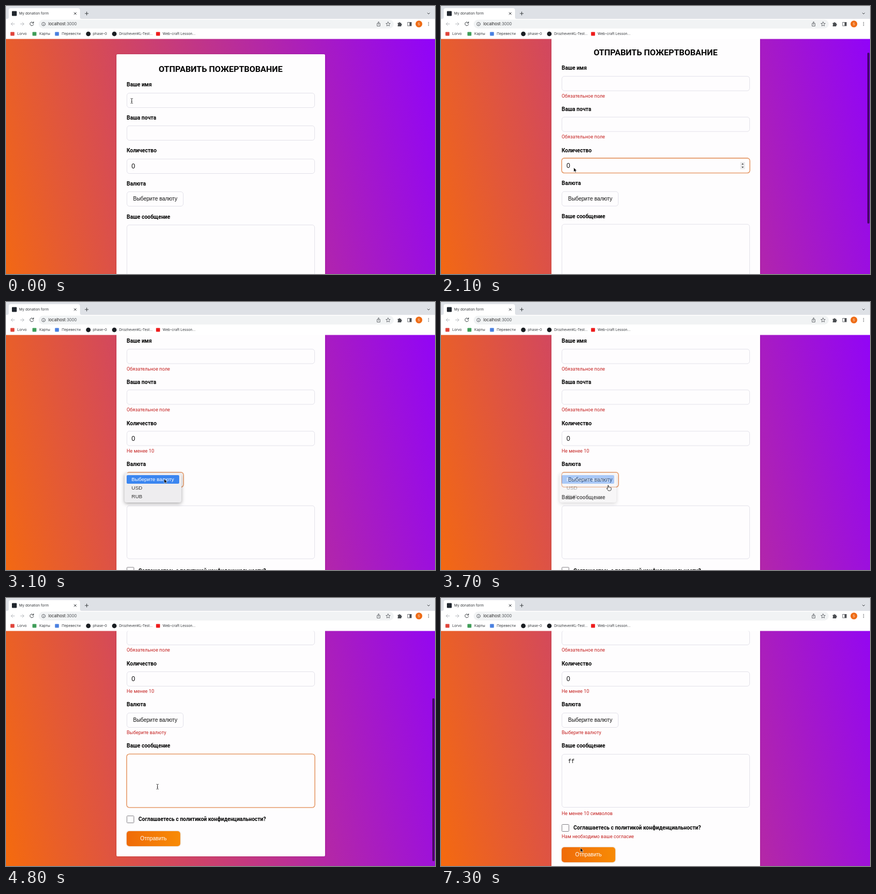
These frames come from a looping animation (800x500 px, 7.4 s). An HTML page:

```html
<!DOCTYPE html>
<html lang="ru">
<head>
<meta charset="utf-8">
<title>My donation form</title>
<style>
* { box-sizing: border-box; }
html, body { margin: 0; width: 100%; height: 100%; overflow: hidden; }
#stage { position: relative; width: 800px; height: 500px; overflow: hidden; background: #fff; }
svg { position: absolute; left: 0; top: 0; }
#browser { z-index: 1; font: 6.6px Inter, sans-serif; }

#view { position: absolute; top: 61px; width: 800px; height: 439px; overflow: hidden; }
#page { padding: 29px 0 28px; background: linear-gradient(78deg, #f56b0d, #9003fa); }
#card {
  margin-left: 205.5px; width: 389.5px; padding: 18px 19.5px 19.5px;
  border-radius: 2px; background: #fefdfe; box-shadow: 0 0 3px rgba(0, 0, 0, .14);
  font: 8.89px Roboto, sans-serif; color: #000;
}
h1 { margin: 0 0 12px; font-size: 15.56px; line-height: 20px; text-align: center; white-space: nowrap; }
.field { margin-bottom: 12.15px; }
.label { font-size: 10px; font-weight: 700; line-height: 14px; white-space: nowrap; }
.box {
  position: relative; margin-top: 7.5px; height: 28px; padding-left: 8px;
  border: 1px solid #e3e2ea; border-radius: 5px; background: #fefdfe;
  font: 12.2px/26px "Liberation Sans", Arial, sans-serif; color: #111;
}
.select { width: 106px; padding-left: 11px; font-size: 10px; }
.area { height: 100px; padding: 8px 11px; font: 10px/12px "Liberation Mono", monospace; }
.error { display: none; height: 15.2px; padding-top: 4px; line-height: 11px; color: #c4201f; }
.invalid .error { display: block; }
#message { margin-bottom: 15.5px; }
#message .error { padding-top: 6px; }
#agree { position: relative; margin-bottom: 14.5px; }
#agree .label { padding-left: 22px; }
#agree .box { position: absolute; left: 0; top: 0; width: 14px; height: 14px; margin: 0; border-color: #858388; border-radius: 1.5px; }
.focus .box, #agree.focus .box { border-color: #ebab80; box-shadow: 0 0 0 .6px #de8146; }
.button {
  width: 100px; height: 28px; border-radius: 5px; background: linear-gradient(90deg, #ef6b08, #f88b05);
  box-shadow: 0 0 2px rgba(120, 60, 0, .5);
  font: 10px/28px "Liberation Sans", Arial, sans-serif; color: #fff; text-align: center;
}
#spinner { left: auto; right: 8px; top: 6px; position: absolute; }

#scrollbar { position: absolute; left: 795px; width: 4px; border-radius: 2px; background: rgba(0, 0, 0, .55); }
#suggest {
  position: absolute; left: 280px; top: 271px; width: 120px; height: 50px; border-radius: 2px;
  background: #fff; box-shadow: 0 1px 3px rgba(0, 0, 0, .4); font: 7px/24px Inter, sans-serif; color: #222;
}
#suggest::before {
  content: ""; position: absolute; left: 9px; top: -3px; width: 7px; height: 7px;
  background: #fff; transform: rotate(45deg); box-shadow: -1px -1px 1px rgba(0, 0, 0, .1);
}
#suggest div { position: relative; height: 25px; padding-left: 7px; white-space: nowrap; }
#suggest div + div { padding-left: 22px; border-top: 1px solid #ddd; color: #666; }
#suggest i { position: absolute; left: 8px; top: 8px; width: 7px; height: 7px; border-radius: 50%; background: #666; }
#menu {
  position: absolute; left: 221px; top: 319px; width: 106px; height: 55px; padding: 4px; border-radius: 4px;
  background: #eeedef; box-shadow: 0 2px 7px rgba(0, 0, 0, .35); font: 9.6px/16px "Liberation Sans", Arial, sans-serif; color: #333;
}
#menu div { height: 16px; padding-left: 9px; border-radius: 2px; white-space: nowrap; }
#menu div:first-child { background: #3b86f0; color: #fff; }
</style>
</head>
<body>
<div id="stage">
  <svg id="browser" width="800" height="62" fill="none" stroke-linecap="round">
    <path fill="#dee1e6" d="M0 0H800V24H0z"/>
    <path fill="#fff" d="M0 24H800V61.500H0z"/>
    <path fill="#fff" d="M2 24q3 0 3-3V8q0-4 4-4H134q4 0 4 4V21q0 3 3 3z"/>
    <rect x="11" y="9.500" width="9" height="9" rx="1" fill="#20262d"/>
    <g stroke="#3c4043">
      <path d="M127 12l4 4m0-4l-4 4M147.500 14h6m-3-3v6M786 13l2 2 2-2"/>
      <path d="M51 31.500a3.400 3.400 0 1 0 .4 2.800M51.500 29.500v2.500h-2.500"/>
    </g>
    <path stroke="#b9bcc0" d="M16 33.500H9.500m3-3l-3 3 3 3M27 33.500h6.500m-3-3l3 3-3 3"/>
    <rect x="61" y="25.500" width="662" height="16.500" rx="8.250" fill="#f1f3f4"/>
    <g stroke="#5f6368" stroke-width=".9">
      <circle cx="70" cy="33.700" r="3.300"/>
      <path d="M70 33.500v2M70 31.800v.1"/>
      <path d="M693.500 32.500h-1.500v5h5.500v-5H696M694.800 35v-5.500m-1.500 1.500l1.500-1.500 1.500 1.500"/>
      <path d="M712.500 29.700l1.200 2.600 2.800.3-2.100 1.900.6 2.800-2.500-1.400-2.500 1.400.6-2.800-2.100-1.900 2.800-.3z"/>
      <rect x="749" y="30.500" width="7" height="6.500"/>
    </g>
    <g fill="#4a4d51">
      <path d="M752.500 30.500H756V37h-3.500zM730.500 31.500h2a1.300 1.300 0 0 1 2.600 0h2v2a1.300 1.300 0 0 1 0 2.600v2h-6.600v-2.200a1.200 1.200 0 0 0 0-2.200z"/>
      <circle cx="788" cy="30.800" r=".8"/><circle cx="788" cy="33.500" r=".8"/><circle cx="788" cy="36.200" r=".8"/>
    </g>
    <circle cx="770" cy="33.500" r="6.300" fill="#ee6c16"/>
    <text x="770" y="35.800" font-size="6" fill="#fff" text-anchor="middle">S</text>
    <text x="24.500" y="16.400" fill="#33363a">My donation form</text>
    <text x="79" y="36.300" font-size="7.500" fill="#222">localhost<tspan fill="#4c5054">:3000</tspan></text>
    <g id="bookmarks" fill="#33363a"></g>
  </svg>

  <div id="view">
    <div id="page"><div id="card">
      <h1>ОТПРАВИТЬ ПОЖЕРТВОВАНИЕ</h1>
      <div class="field" id="name"><div class="label">Ваше имя</div><div class="box"></div><div class="error">Обязательное поле</div></div>
      <div class="field" id="email"><div class="label">Ваша почта</div><div class="box"></div><div class="error">Обязательное поле</div></div>
      <div class="field" id="amount"><div class="label">Количество</div><div class="box">0
        <svg id="spinner" width="9" height="14"><rect width="9" height="14" rx="1" fill="#ececee"/><path fill="#444" d="M2.500 5l2-2.500 2 2.500zM2.500 9l2 2.500 2-2.500z"/></svg>
      </div><div class="error">Не менее 10</div></div>
      <div class="field" id="currency"><div class="label">Валюта</div><div class="box select">Выберите валюту</div><div class="error">Выберите валюту</div></div>
      <div class="field" id="message"><div class="label">Ваше сообщение</div><div class="box area"></div><div class="error">Не менее 10 символов</div></div>
      <div class="field" id="agree"><div class="box"></div><div class="label">Соглашаетесь с политикой конфиденциальности?</div><div class="error">Нам необходимо ваше согласие</div></div>
      <div class="button">Отправить</div>
    </div></div>
  </div>

  <div id="scrollbar"></div>
  <div id="suggest"><div>selina.torvina@example.com</div><div><i></i>Управление...</div></div>
  <div id="menu"><div>Выберите валюту</div><div>USD</div><div>RUB</div></div>
  <svg width="800" height="500"><g id="cursor">
    <path id="arrow" d="M0 0V8L1.900 6.300 3.200 9.200 4.500 8.600 3.200 5.800H5.700z" fill="#000" stroke="#fff" stroke-width=".6"/>
    <path id="beam" d="M-2-4.500Q0-4.500 0-3.500Q0-4.500 2-4.500M0-3.500V3.500M-2 4.500Q0 4.500 0 3.500Q0 4.500 2 4.500M-1 1H1" fill="none" stroke="#222" stroke-width=".9"/>
    <path id="hand" d="M-2 0V-4q0-1 .8-1t.8 1V-1.500q1.500-.6 1.800.2 1.200-.3 1.500.5 1.400-.2 1.400.9V2q0 2.500-1.500 3H-1Q-2.500 3-4.200.8q.5-1.300 2.200.2z" fill="#fff" stroke="#222" stroke-width=".9"/>
  </g></svg>
</div>

<script>
const LOOP = 7400, TRACK_TOP = 64, TRACK_HEIGHT = 434;
const $ = id => document.getElementById(id);

// icon x, icon colour, shape, text x, text
const bookmarks = [
  [12, '#e0443a', 'square', 21, 'Lorvo'],
  [53, '#3f9d58', 'square', 62, 'Карты'],
  [95, '#4a80e0', 'square', 104, 'Перевести'],
  [153.5, '#1b1f23', 'circle', 162, 'phase-0'],
  [202, '#1b1f23', 'circle', 211, 'DrozhevenKL-Test...'],
  [283.5, '#ee1c1c', 'square', 292, 'Web-craft Lesson...'],
];
$('bookmarks').innerHTML = bookmarks.map(([x, color, shape, textX, text]) =>
  (shape === 'circle'
    ? `<circle cx="${x}" cy="52" r="4.3" fill="${color}"/>`
    : `<rect x="${x - 3.7}" y="48.500" width="7.400" height="7" rx="1" fill="${color}"/>`) +
  `<text x="${textX}" y="54.400">${text}</text>`).join('');

// field, focus time, blur time (validation runs on blur)
const focusSteps = [
  ['name', 300, 950], ['email', 950, 1700], ['amount', 1700, 2900],
  ['currency', 2900, 4100], ['message', 4100, 5700], ['agree', 5700, 7200],
];
const scrollKeys = [[1900, 0], [2350, 74.5], [4200, 74.5], [4700, 178]];
// time, x, y, shape shown from this moment on
const cursorKeys = [
  [0, 234.5, 177, 'beam'], [550, 234.5, 177, 'beam'], [850, 236, 238, 'beam'], [1100, 237, 242, 'beam'],
  [1300, 240, 285, 'arrow'], [1450, 240, 285, 'arrow'], [1600, 243, 312, 'beam'], [1900, 246, 306, 'arrow'],
  [2300, 249, 297, 'arrow'], [2500, 249, 297, 'arrow'], [2800, 290, 318, 'hand'], [3100, 295, 330, 'arrow'],
  [3600, 313, 347, 'hand'], [3750, 313, 347, 'hand'], [4000, 288, 404, 'beam'], [4200, 284, 400, 'beam'],
  [4700, 282.5, 352, 'beam'], [5400, 282.5, 352, 'beam'], [5650, 234, 411, 'arrow'], [6000, 235, 413, 'arrow'],
  [6400, 235, 413, 'arrow'], [6850, 258, 463, 'hand'], [7200, 260, 466, 'arrow'],
];

const clamp = v => Math.max(0, Math.min(1, v));
const ramp = (t, from, to) => clamp((t - from) / (to - from));
const within = (t, from, to) => t >= from && t < to;
const show = (id, on) => { $(id).style.display = on ? '' : 'none'; };

function tween(keys, t, index) {
  const next = keys.findIndex(key => key[0] > t);
  if (next < 0) return keys[keys.length - 1][index];
  if (next === 0) return keys[0][index];
  const a = keys[next - 1], b = keys[next], p = ramp(t, a[0], b[0]);
  return a[index] + (b[index] - a[index]) * p * p * (3 - 2 * p);
}

function render(t) {
  for (const [id, focus, blur] of focusSteps) {
    $(id).classList.toggle('focus', within(t, focus, blur));
    $(id).classList.toggle('invalid', t >= blur);
  }
  show('spinner', within(t, 1300, 2900));
  show('suggest', within(t, 1100, 1700));
  show('menu', within(t, 3000, 3900));
  $('menu').style.opacity = 1 - ramp(t, 3500, 3850);
  document.querySelector('.area').textContent = 'f'.repeat((t >= 5100) + (t >= 5300));

  const scroll = tween(scrollKeys, t, 1);
  $('page').style.transform = `translateY(${-scroll}px)`;
  const ratio = TRACK_HEIGHT / $('page').offsetHeight, bar = $('scrollbar').style;
  bar.top = TRACK_TOP + scroll * ratio + 'px';
  bar.height = $('view').offsetHeight * ratio + 'px';
  bar.opacity = t < 3500
    ? ramp(t, 1850, 1950) - ramp(t, 2700, 2950)
    : ramp(t, 4150, 4250) - ramp(t, 5100, 5350);

  const shape = cursorKeys.filter(key => key[0] <= t).pop()[3];
  for (const id of ['arrow', 'beam', 'hand']) show(id, id === shape);
  $('cursor').setAttribute('transform', `translate(${tween(cursorKeys, t, 1)} ${tween(cursorKeys, t, 2)})`);
}

const start = performance.now();
function frame() {
  render((performance.now() - start) % LOOP);
  requestAnimationFrame(frame);
}
frame();
</script>
</body>
</html>
```
